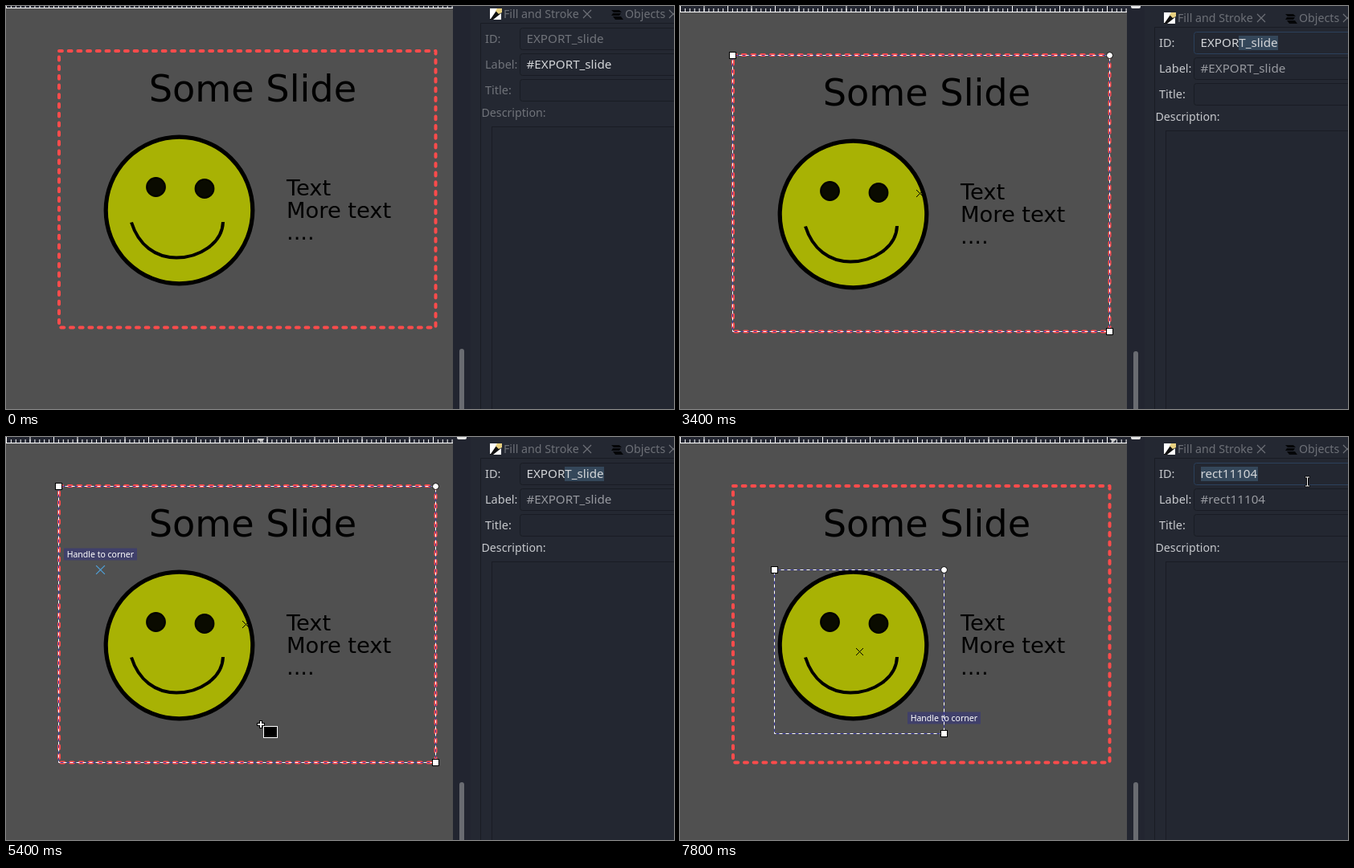
Animation, 831 px wide and 502 px high, one loop 8000 ms. Source, as an HTML page:

```html
<!DOCTYPE html>
<html lang="en">
<head>
<meta charset="utf-8">
<title>Slide export</title>
<style>
html, body { margin: 0; width: 100%; height: 100%; overflow: hidden; background: #242832; }
svg { display: block; width: 831px; height: 502px; cursor: default; user-select: none; }
text { white-space: pre; }
.slide { font-family: "DejaVu Sans", sans-serif; }
.ui { font: 14.2px "Noto Sans", sans-serif; }
.label { font-size: 14.5px; }
.entry { font-size: 15.2px; }
.field { fill: #232731; stroke: #191c24; }
.base { fill: none; stroke: #3c3ca4; }
.line { fill: none; stroke: #fff; stroke-dasharray: 4 4; }
.knob { fill: #fff; stroke: #000; }
</style>
</head>
<body>
<svg viewBox="0 0 831 502">
  <defs>
    <path id="grip" d="M-7 0L-2-5.5V-2H2V-5.5L7 0L2 5.5V2H-2V5.5Z" fill="#c9c9c9"/>
    <path id="ex" d="M-4.5-4.5L4.5 4.5M4.5-4.5L-4.5 4.5" fill="none"/>
    <g id="tip" class="ui">
      <rect width="91" height="15" fill="#40406a"/>
      <text x="3.7" y="11.5" font-size="10.5" fill="#fff">Handle to corner</text>
    </g>
  </defs>
  <rect width="556" height="502" fill="#505050"/>
  <rect x="556" width="22" height="502" fill="#222530"/>
  <rect id="scroll" x="564" y="427" width="6" height="90" rx="3" fill="#696b71"/>

  <g id="view">
    <rect y="-10" width="556" height="12" fill="#222530"/>
    <g stroke="#fff">
      <path d="M0 0H556" stroke-width="4" stroke-dasharray="1 4.9"/>
      <path d="M0-2H556" stroke-width="7" stroke-dasharray="1 28.5"/>
      <path d="M0 2.5H556"/>
    </g>
    <path id="marker" d="M-4.5-3H4.5L0 2Z" fill="#c8c8c8"/>
    <rect x="561" y="-9" width="12" height="7" rx="2" fill="#e4e4e4"/>

    <g class="slide">
      <text x="177.7" y="119" font-size="46.2">Some Slide</text>
      <g font-size="27.3">
        <text x="349" y="236">Text</text>
        <text x="349" y="263.5">More text</text>
        <text x="349" y="291">....</text>
      </g>
    </g>
    <circle cx="215.5" cy="254.5" r="91.3" fill="#a8b204" stroke="#000" stroke-width="5.2"/>
    <g fill="#0a0b00" stroke="#000" stroke-width="2">
      <circle cx="186.5" cy="225.5" r="11.4"/>
      <circle cx="247" cy="227.5" r="11.4"/>
    </g>
    <path d="M156 269.5C165 298 186 313.5 212 313.5C240 313.5 269 296 270 269" fill="none" stroke="#000" stroke-width="4"/>
    <rect x="66" y="56" width="468.5" height="344.5" fill="none" stroke="#ff4b4b" stroke-width="4" stroke-dasharray="3.9 7.8" stroke-linecap="round" stroke-linejoin="round"/>

    <g id="pick">
      <rect x="65.5" y="56.5" width="469" height="344" class="base"/>
      <rect x="65.5" y="56.5" width="469" height="344" class="line"/>
      <g id="grips"></g>
    </g>
    <g id="tip1">
      <use href="#tip" x="72" y="133.5"/>
      <use href="#ex" transform="translate(117.5 160.5) scale(1.2)" stroke="#4fa3dc"/>
    </g>
    <use id="tip2" href="#tip" x="283" y="337.5"/>
    <use id="snap" href="#ex" transform="translate(328.5 364.5) scale(1.2)" stroke="#8a8a8a"/>
    <g id="boxes"></g>
  </g>

  <rect x="578" width="253" height="502" fill="#242832"/>
  <g id="panel" class="ui">
    <path d="M590.5 510V21.5H840" fill="none" stroke="#191c24"/>
    <g fill="#6d7077">
      <text x="619" y="15">Fill and Stroke</text>
      <text x="770" y="15">Objects</text>
    </g>
    <path d="M718 5L728 15M728 5L718 15M825 5L835 15M835 5L825 15" stroke="#6d7077" stroke-width="1.2"/>
    <path d="M602 3H616V17H602Z" fill="#111"/>
    <path d="M602 3H612L603 16H602ZM616 9V17H606Z" fill="#fff"/>
    <path d="M611 3H617V8L613 10L609 6Z" fill="#e8d080"/>
    <path d="M753 5h10l3 3h-10zM755 9h10l-2 3h-10zM755 13h10l3 4h-10z" fill="#050608"/>
    <rect id="idBox" class="field" x="639.5" y="27.5" width="210" height="27" rx="3"/>
    <rect class="field" x="639.5" y="59.5" width="210" height="27" rx="3"/>
    <rect class="field" x="639.5" y="91.5" width="210" height="27" rx="3"/>
    <rect class="field" x="604.5" y="150.5" width="250" height="380"/>
    <g id="labels">
      <g class="label">
        <text x="596" y="46">ID:</text>
        <text x="596" y="78">Label:</text>
        <text x="596" y="110">Title:</text>
      </g>
      <text x="591.5" y="138">Description:</text>
    </g>
    <rect id="mark" y="32" height="18" fill="#34475a"/>
    <text id="idText" class="entry" x="647.5" y="46"></text>
    <text id="labelText" class="entry" x="647.5" y="78"></text>
  </g>

  <g id="arrow"><path d="M.5 .5V16L4 12.7L6.8 19L9.6 17.8L6.8 11.8H11.5Z" fill="#fff" stroke="#15171d"/></g>
  <g id="cross">
    <path d="M-5 0H5M0-5V5" stroke="#000" stroke-width="4"/>
    <path d="M-4 0H4M0-4V4" stroke="#fff" stroke-width="2"/>
    <rect x="3.5" y="2.5" width="17" height="14" fill="#000" stroke="#fff"/>
  </g>
  <g id="beam" fill="none">
    <path d="M-3-5.5H3M0-5.5V5.5M-3 5.5H3" stroke="#000" stroke-width="3"/>
    <path d="M-2.5-5.5H2.5M0-5.5V5.5M-2.5 5.5H2.5" stroke="#fff"/>
  </g>
</svg>
<script>
const $ = id => document.getElementById(id);
const set = (id, name, value) => $(id).setAttribute(name, value);
const show = (id, on) => set(id, 'visibility', on ? 'visible' : 'hidden');
const move = (id, x, y) => set(id, 'transform', `translate(${x} ${y})`);

// Pointer path: time, shape, x, y
const path = [
  [0, ''], [100, 'arrow', 398, 25], [300, 'arrow', 230, 150], [500, 'arrow', 42, 240],
  [600, 'arrow', 63, 247], [800, 'arrow', 63, 247], [1000, 'arrow', 522, 130],
  [1100, 'arrow', 700, 80], [1200, 'arrow', 785, 57], [1300, 'arrow', 787, 55],
  [1600, 'arrow', 750, 44], [1700, 'beam', 744, 42], [1900, 'beam', 695, 42],
  [2000, 'arrow', 600, 34], [2100, 'arrow', 445, 12], [2200, ''],
  [3700, 'cross', 445, 20], [4000, 'cross', 300, 200], [4200, 'cross', 190, 234],
  [4500, 'cross', 107, 155], [4600, 'cross', 150, 195], [4800, 'cross', 284, 313],
  [5000, 'cross', 306, 345], [5400, 'cross', 317, 358], [5700, 'cross', 317, 358],
  [6200, 'cross', 325, 362], [6800, 'cross', 325, 362], [6900, 'cross', 539, 250],
  [7000, ''], [7300, 'beam', 652, 48], [7800, 'beam', 780.5, 55.5], [8000, '']
];

function pointer(t) {
  const i = path.findLastIndex(k => k[0] <= t);
  const [t0, kind, x, y] = path[i], next = path[i + 1];
  if (!next || !next[1]) return { kind, x, y };
  const f = (t - t0) / (next[0] - t0);
  return { kind, x: x + (next[2] - x) * f, y: y + (next[3] - y) * f };
}

// The ruler keeps the last position inside the drawing area
function rulerX(t) {
  for (; t >= 0; t -= 100) {
    const p = pointer(t);
    if (p.kind && p.x < 556) return p.x;
  }
}

function box(id, x, y, w, h, cx, cy) {
  const r = x + w, b = y + h;
  const rect = name => `<rect x="${x}" y="${y}" width="${w}" height="${h}" class="${name}"/>`;
  return `<g id="${id}">${rect('base')}${rect('line')}
    <rect x="${x - 4}" y="${y - 4}" width="8" height="8" class="knob"/>
    <rect x="${r - 4}" y="${b - 4}" width="8" height="8" class="knob"/>
    <circle cx="${r}" cy="${y}" r="4" class="knob"/>
    <use href="#ex" x="${cx}" y="${cy}" stroke="#000"/></g>`;
}
$('boxes').innerHTML = box('bigBox', 65.5, 56.5, 469, 344, 298.5, 228.5) +
  box('newBox', 117.5, 160.5, 211, 204, 223.5, 262.5);
$('grips').innerHTML = [
  [60, 50, 45], [299.5, 48, 90], [541, 50, -45], [58, 228.5, 0],
  [542, 228.5, 0], [60, 407, -45], [299.5, 408, 90], [541, 407, 45]
].map(([x, y, a]) => `<use href="#grip" transform="translate(${x} ${y}) rotate(${a})"/>`).join('');

function draw(t) {
  const within = (a, b) => t >= a && t < b;
  const dy = t < 3400 ? 0 : 5, on = t >= 800, renamed = t >= 6600;
  move('view', 0, dy);
  move('panel', 0, dy);
  set('scroll', 'y', t < 3400 ? 427 : 430);

  show('pick', within(800, 3400));
  show('bigBox', within(3400, 6600));
  show('newBox', renamed);
  show('tip1', within(4500, 5500));
  show('tip2', t >= 5500);
  show('snap', within(5500, 6600));

  const name = renamed ? 'rect11104' : 'EXPORT_slide';
  $('idText').textContent = name;
  $('labelText').textContent = '#' + name;
  set('labels', 'fill', on ? '#c6c8cc' : '#70737a');
  set('idText', 'fill', on ? '#d3d5d8' : '#70737a');
  set('labelText', 'fill', on ? '#989aa0' : '#d3d5d8');
  $('idBox').style.stroke = within(1700, 3700) || t >= 7300 ? '#2b405b' : '';

  const p = pointer(t);
  let from = 0, to = 0;
  if (within(1700, 6600)) {
    from = t < 1900 ? p.x : 695;
    to = 744;
  } else if (t >= 7300) {
    from = 648;
    to = Math.min(719, p.x);
  }
  set('mark', 'x', from);
  set('mark', 'width', to - from);

  for (const kind of ['arrow', 'cross', 'beam']) {
    show(kind, p.kind === kind);
    if (p.kind === kind) move(kind, p.x, p.y);
  }
  const ruled = within(100, 2200) || t >= 3700;
  show('marker', ruled);
  if (ruled) move('marker', rulerX(t), 0);
}

const start = performance.now();
function tick() {
  const t = (performance.now() - start) % 8000;
  draw(Math.floor(t / 100) * 100);
  requestAnimationFrame(tick);
}
tick();
</script>
</body>
</html>
```
